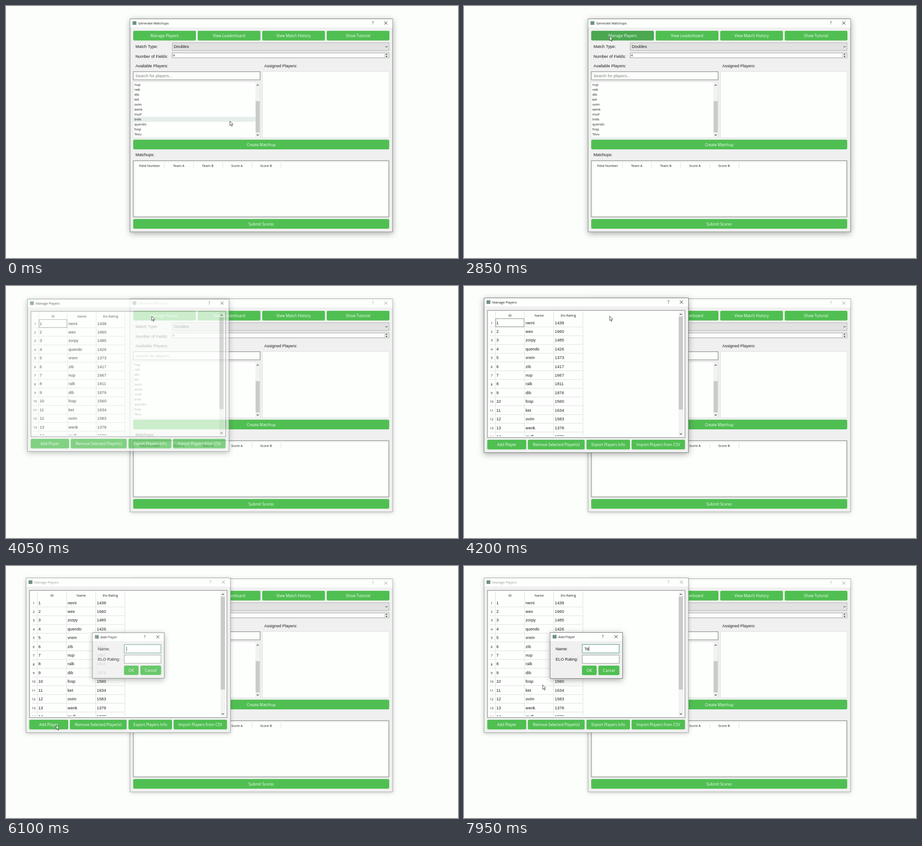
Animation, 1002 px wide and 559 px high, one loop 8000 ms. Source, as an HTML page with a canvas:

```html
<!DOCTYPE html>
<html lang="en">
<head>
<meta charset="utf-8">
<title>Matchups</title>
<style>
  html, body { margin: 0; width: 100%; height: 100%; overflow: hidden; background: #fcfefc; }
  canvas { display: block; width: 1002px; height: 559px; }
</style>
</head>
<body>
<canvas id="stage" width="1002" height="559"></canvas>
<script>
const W = 1002, H = 559, LOOP = 8000, STEP = 50;
const view = document.getElementById('stage').getContext('2d');
const layer = document.createElement('canvas');
layer.width = W;
layer.height = H;
const layerCtx = layer.getContext('2d');
let g = view;

const UI = '"Open Sans", "Noto Sans", sans-serif';
const ARIAL = '"Liberation Sans", Arial, sans-serif';
const INK = '#1c1c1c', PAPER = '#fdfffd', BODY = '#eff0ef';
const GREEN = '#50bf52', HOVER = '#4ba850', FRAME = '#8c8e8c', FAINT = '#dfe1df';

const LIST = ['nup', 'ralk', 'dib', 'ket', 'ovim', 'wenk', 'mulf', 'trelk', 'quendo', 'fosp', 'Tevu'];
const PLAYERS = [
  ['nemi', 1438], ['wex', 1660], ['zorpy', 1485], ['quendo', 1426], ['vrem', 1373],
  ['zib', 1417], ['nup', 1667], ['ralk', 1811], ['dib', 1876], ['fosp', 1560],
  ['ket', 1634], ['ovim', 1583], ['wenk', 1378], ['mulf', 1838]
];

// Moments at which each dialog takes the focus
const MANAGE_AT = 3950, ADD_AT = 5980;

// Pointer stops: time, x, y
const PATH = [
  [50, 496, 255], [350, 510, 42], [850, 480, 494], [900, 480, 494],
  [1250, 350, 44], [1350, 321.5, 66], [1500, 322.5, 66.5],
  [4500, 322.5, 66.5], [5400, 111, 352.5], [6350, 111, 352.5], [7150, 174, 263.5]
];

const clamp = v => Math.max(0, Math.min(1, v));
const smooth = p => p * p * (3 - 2 * p);
const easeOut = p => 1 - (1 - p) ** 3;

function pointerAt(t) {
  let a = PATH[0];
  for (const b of PATH) {
    if (t < b[0]) {
      const p = b === a ? 0 : smooth(clamp((t - a[0]) / (b[0] - a[0])));
      return { x: a[1] + (b[1] - a[1]) * p, y: a[2] + (b[2] - a[2]) * p };
    }
    a = b;
  }
  return { x: a[1], y: a[2] };
}

function inside(p, x, y, w, h) {
  return p && p.x >= x && p.x < x + w && p.y >= y && p.y < y + h;
}

function fill(x, y, w, h, color) {
  g.fillStyle = color;
  g.fillRect(x, y, w, h);
}

function box(x, y, w, h, back, edge, line = 1) {
  fill(x, y, w, h, back);
  g.strokeStyle = edge;
  g.lineWidth = line;
  g.strokeRect(x + line / 2, y + line / 2, w - line, h - line);
}

// The y value is the middle of the capital letters
function text(str, x, y, size, font, color = INK, align = 'left') {
  g.font = `${size}px ${font}`;
  g.textAlign = align;
  g.fillStyle = color;
  g.fillText(str, x, y + size * 0.36);
}

const label = (str, x, y, color) => text(str, x, y, 9.15, ARIAL, color);
const small = (str, x, y, align, color) => text(str, x, y, 7.35, UI, color, align);

function stroke(points, color, width) {
  g.beginPath();
  points.forEach(([x, y], i) => i ? g.lineTo(x, y) : g.moveTo(x, y));
  g.strokeStyle = color;
  g.lineWidth = width;
  g.stroke();
}

function chevron(x, y, dir, r = 2.3, color = '#444') {
  stroke([[x - r, y - dir * r / 2], [x, y + dir * r / 2], [x + r, y - dir * r / 2]], color, 1.2);
}

function button(str, x, y, w, h, pointer) {
  g.beginPath();
  g.roundRect(x, y, w, h, 3);
  g.fillStyle = inside(pointer, x, y, w, h) ? HOVER : GREEN;
  g.fill();
  text(str, x + w / 2, y + h / 2 + 0.3, 8.5, UI, '#f6fff6', 'center');
}

function scrollbar(x, y, w, h, top, bottom) {
  fill(x, y, w, h, '#f1f2f1');
  fill(x + 0.5, top, w - 1, bottom - top, '#c9cac9');
  chevron(x + w / 2, y + 7, -1);
  chevron(x + w / 2, y + h - 6, 1);
}

function windowFrame(title, x, y, w, h, active, helpX, closeX) {
  g.save();
  g.shadowColor = active ? 'rgba(0,0,0,.34)' : 'rgba(0,0,0,.22)';
  g.shadowBlur = active ? 13 : 9;
  g.shadowOffsetY = active ? 3 : 1.5;
  fill(x, y, w, h, BODY);
  g.restore();
  box(x, y, w, h, BODY, active ? '#747674' : '#a2a4a2');
  fill(x + 1, y + 1, w - 2, 18.5, PAPER);
  const mid = y + 9.8, color = active ? INK : '#9a9c9a';
  fill(x + 6, mid - 4, 8.5, 8, '#6f9186');
  small(title, x + 18.8, mid + 0.3, 'left', color);
  text('?', helpX, mid, 8.6, UI, color, 'center');
  const r = 3.4;
  stroke([[closeX - r, mid - r], [closeX + r, mid + r]], color, 1);
  stroke([[closeX + r, mid - r], [closeX - r, mid + r]], color, 1);
}

function drawMain(active, pointer) {
  const p = active ? pointer : null;
  windowFrame('Generate Matchups', 274.5, 28, 583, 473.5, active, 813, 842);
  ['Manage Players', 'View Leaderboard', 'View Match History', 'Show Tutorial']
    .forEach((str, i) => button(str, 282 + i * 143, 55, 139, 21.5, p));

  label('Match Type:', 287, 90);
  box(368, 81, 481.5, 18.5, '#e1e2e1', '#aeb0ae');
  label('Doubles', 372, 90);
  chevron(843.5, 90.3, 1, 2.4, '#666');

  label('Number of Fields:', 287, 112);
  box(368, 103.5, 481.5, 12, PAPER, FRAME);
  text('4', 370, 109.7, 7.6, ARIAL);
  fill(838.5, 104.5, 10, 10, '#eceeec');
  fill(838, 104.5, 0.8, 10, '#c4c6c4');
  chevron(843.5, 107.2, -1, 1.7, '#222');
  chevron(843.5, 111.8, 1, 1.7, '#222');

  label('Available Players:', 287, 132.8);
  label('Assigned Players:', 572.5, 132.8);
  box(281.5, 145, 282.5, 19.5, PAPER, FRAME, 1.3);
  label('Search for players...', 287, 155, '#7e807e');

  box(281.5, 168, 282.5, 124.5, PAPER, FAINT);
  LIST.forEach((name, i) => {
    const top = 169.3 + i * 11;
    if (inside(p, 282, top - 0.2, 271, 11)) fill(282.5, top - 2.6 + 0.1 + 2, 270.5, 11, '#e5eeea');
    small(name, 284.5, top + 5.4);
  });
  scrollbar(553, 168.5, 10, 123.5, 211, 280.5);
  box(568, 145, 281.5, 147.5, PAPER, FAINT);

  button('Create Matchup', 282, 296.5, 567.5, 21.5, p);
  label('Matchups:', 287, 330);
  box(281.5, 342.5, 568, 126, PAPER, FRAME, 1.4);
  g.strokeStyle = '#eceeec';
  g.lineWidth = 1;
  g.strokeRect(285.5, 346.5, 561, 118);
  ['Field Number', 'Team A', 'Team B', 'Score A', 'Score B'].forEach((str, i) => {
    small(str, 318.2 + i * 64.6, 354, 'center');
    fill(350.7 + i * 64.6, 347.5, 1, 13, '#dcdedc');
  });
  button('Submit Scores', 282, 472.5, 567.5, 21.5, p);
}

function drawManage(active, pointer) {
  const p = active ? pointer : null;
  windowFrame('Manage Players', 44, 26, 454, 344, active, 453, 482);
  box(51.5, 53.5, 439, 283.5, PAPER, FRAME, 1.3);

  g.save();
  g.beginPath();
  g.rect(55, 57, 432, 276);
  g.clip();
  ['ID', 'Name', 'Elo Rating'].forEach((str, i) => small(str, 102 + i * 64.7, 65, 'center'));
  for (let i = 0; i < 4; i++) fill(69 + i * 64.7, 57, 1, 276, '#dcdedc');
  PLAYERS.forEach(([name, elo], i) => {
    const y = 81.2 + i * 19.42;
    small(i + 1, 61.3, y + 0.8, 'center');
    fill(56, y + 9.2, 208, 1, '#dcdedc');
    [i + 1, name, elo].forEach((str, c) => text(str, 71.7 + c * 64.8, y, 9.2, ARIAL));
  });
  if (active) {
    g.strokeStyle = '#858785';
    g.lineWidth = 1;
    g.strokeRect(70.5, 72.5, 62.5, 18);
  }
  g.restore();
  scrollbar(475.5, 56, 10.5, 278, 68, 274);

  button('Add Player', 51.5, 341, 86.5, 21.5, p);
  button('Remove Selected Player(s)', 141.5, 341, 126, 21.5, p);
  button('Export Players Info', 271.5, 341, 96.5, 21.5, p);
  button('Import Players from CSV', 371.5, 341, 118.5, 21.5, p);
}

function drawAdd(t) {
  windowFrame('Add Player', 190.5, 147, 161.5, 103, true, 307.5, 337);
  label('Name:', 203, 184);
  label('ELO Rating:', 203, 207.2);
  box(261.5, 173.5, 83, 20, PAPER, '#5d9d8e', 1.2);
  box(261.5, 197, 83, 19.5, PAPER, FRAME);

  const typed = t < 7300 ? '' : t < 7600 ? 'T' : 'Te';
  const since = t < 7300 ? t - ADD_AT : t < 7600 ? t - 7300 : t - 7600;
  label(typed, 267, 184);
  g.font = `9.15px ${ARIAL}`;
  if (Math.floor(since / 530) % 2 === 0) {
    fill(266.8 + g.measureText(typed).width, 178.5, 0.9, 10.5, '#222');
  }
  button('OK', 261.5, 221, 32.5, 21);
  button('Cancel', 298, 221, 46.5, 21);
}

// Fades and grows a window into place
function openWindow(age, cx, cy, draw) {
  if (age <= 0) return;
  const p = clamp(age / 210);
  if (p === 1) return draw();
  layerCtx.clearRect(0, 0, W, H);
  g = layerCtx;
  draw();
  g = view;
  const s = 0.9 + 0.1 * easeOut(p);
  g.save();
  g.globalAlpha = clamp(p * 1.5);
  g.translate(cx, cy);
  g.scale(s, s);
  g.drawImage(layer, -cx, -cy);
  g.restore();
}

function drawPointer({ x, y }) {
  g.save();
  g.translate(x, y);
  g.beginPath();
  [[0.4, 0.2], [0.4, 10.2], [2.7, 8.1], [4.3, 11.8], [5.9, 11.1], [4.3, 7.5], [7.3, 7.3]]
    .forEach(([px, py], i) => i ? g.lineTo(px, py) : g.moveTo(px, py));
  g.closePath();
  g.fillStyle = '#fff';
  g.fill();
  g.strokeStyle = '#333';
  g.lineWidth = 0.9;
  g.stroke();
  g.restore();
}

function render(t) {
  const pointer = pointerAt(t);
  fill(0, 0, W, H, '#fcfefc');
  drawMain(t < MANAGE_AT, pointer);
  openWindow(t - MANAGE_AT, 271, 198, () => drawManage(t < ADD_AT, pointer));
  openWindow(t - ADD_AT, 271, 198.5, () => drawAdd(t));
  drawPointer(pointer);
}

const start = performance.now();
function tick() {
  const t = (performance.now() - start) % LOOP;
  render(Math.floor(t / STEP) * STEP);
  requestAnimationFrame(tick);
}
tick();
</script>
</body>
</html>
```
